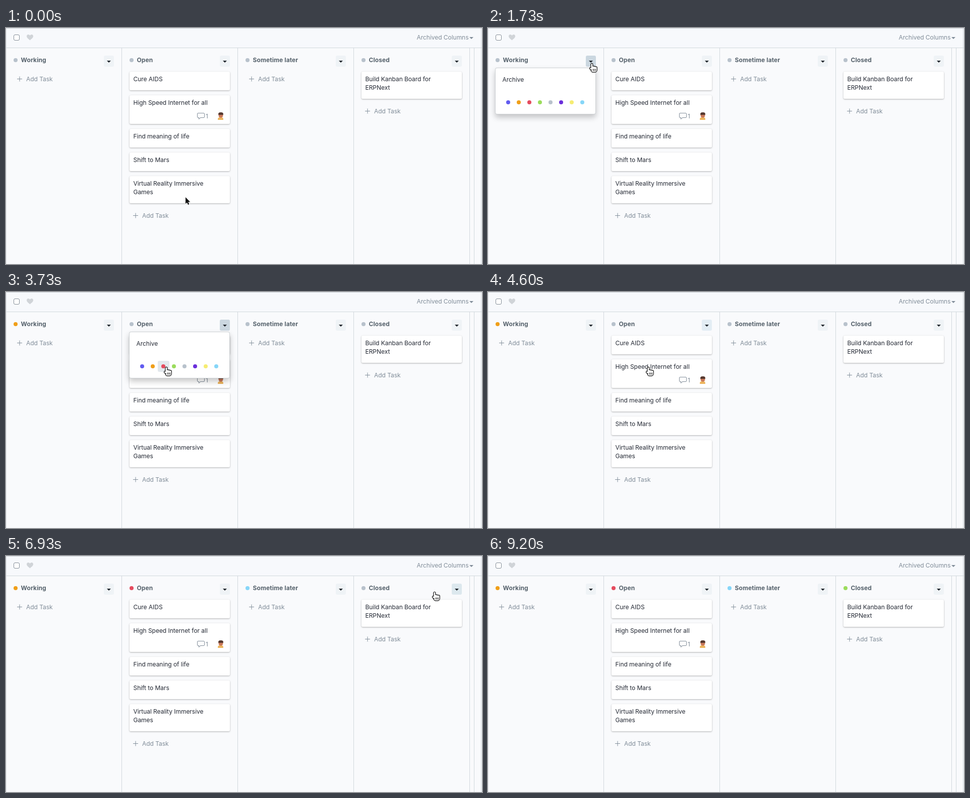
These frames come from a looping animation (944x470 px, 9.27 s). An HTML page with a canvas:

```html
<!DOCTYPE html>
<html lang="en">
<head>
<meta charset="utf-8">
<title>Kanban board</title>
<style>
  html, body { margin: 0; width: 100%; height: 100%; overflow: hidden; background: #f9fafc; }
  canvas { display: block; }
</style>
</head>
<body>
<canvas id="board" width="944" height="470"></canvas>
<script>
const ctx = document.getElementById('board').getContext('2d');
const W = 944, H = 470, LOOP = 9270, FPS = 15;
const COL = 230, LINE_H = 17, GAP = 10;
const FONT = '12px Inter, sans-serif';
const BOLD = 'bold ' + FONT;
const LINE = '#d1d8dd', MUTED = '#818d99', INK = '#252a35', GREY = '#b8c2cc';
const COLORS = ['#615cf0', '#f09f19', '#e54b5e', '#9bdc5c', GREY, '#6b2fdb', '#f6ec72', '#86d6f8'];

// Each column's menu opens, then closes when a colour is picked.
const columns = [
  { name: 'Working', open: 1560, close: 2300, pick: 1, cards: [] },
  { name: 'Open', open: 2980, close: 4530, pick: 2, cards: [
    { lines: ['Cure AIDS'] },
    { lines: ['High Speed Internet for all'], meta: true },
    { lines: ['Find meaning of life'] },
    { lines: ['Shift to Mars'] },
    { lines: ['Virtual Reality Immersive', 'Games'] }
  ] },
  { name: 'Sometime later', open: 5480, close: 6590, pick: 7, cards: [] },
  { name: 'Closed', open: 7150, close: 8350, pick: 3, cards: [
    { lines: ['Build Kanban Board for', 'ERPNext'] }
  ] }
];

const isOpen = (col, t) => t >= col.open && t < col.close;
const swatchX = i => 40 + 21 * i;

// The pointer visits every menu button, then the colour to pick.
const stops = [{ t: 250, x: 356, y: 337 }];
columns.forEach((col, i) => {
  const button = { x: i * COL + 206, y: 71 };
  const swatch = { x: i * COL + swatchX(col.pick) + 6, y: 150 };
  stops.push(
    { t: col.open - 150, ...button }, { t: col.open + 200, ...button },
    { t: col.open + 690, ...swatch }, { t: col.close + 70, ...swatch }
  );
});
stops.push({ t: 8740, x: 806, y: H + 10 });

function pointerAt(t) {
  const next = stops.findIndex(s => s.t > t);
  if (next === 0) return stops[0];
  if (next < 0) return stops[stops.length - 1];
  const a = stops[next - 1], b = stops[next];
  const u = (t - a.t) / (b.t - a.t);
  const k = u * u * (3 - 2 * u);
  const bow = a.x === b.x ? 0 : Math.sin(Math.PI * k);
  return {
    x: a.x + (b.x - a.x) * k - 70 * bow,
    y: a.y + (b.y - a.y) * k - 22 * bow
  };
}

function rect(x, y, w, h, color) {
  ctx.fillStyle = color;
  ctx.fillRect(x, y, w, h);
}

function rounded(x, y, w, h, r, color) {
  ctx.beginPath();
  ctx.roundRect(x, y, w, h, r);
  ctx.fillStyle = color;
  ctx.fill();
}

function dot(x, y, r, color) {
  ctx.beginPath();
  ctx.arc(x, y, r, 0, Math.PI * 2);
  ctx.fillStyle = color;
  ctx.fill();
}

function text(str, x, y, color, font = FONT) {
  ctx.font = font;
  ctx.letterSpacing = font === BOLD ? '0.1px' : '-0.04px';
  ctx.fillStyle = color;
  ctx.fillText(str, x, y);
}

function caret(x, y, color) {
  ctx.beginPath();
  ctx.moveTo(x - 4, y);
  ctx.lineTo(x + 4, y);
  ctx.lineTo(x, y + 4);
  ctx.fillStyle = color;
  ctx.fill();
}

function shadowed(blur, dy, alpha, paint) {
  ctx.save();
  ctx.shadowColor = `rgba(0,0,0,${alpha})`;
  ctx.shadowBlur = blur;
  ctx.shadowOffsetY = dy;
  paint();
  ctx.restore();
}

function heart(x, y) {
  ctx.beginPath();
  for (const side of [-1, 1]) {
    ctx.moveTo(x, y + 9.5);
    ctx.bezierCurveTo(x + side * 2.5, y + 7, x + side * 6.5, y + 4.5, x + side * 6.5, y + 1.5);
    ctx.bezierCurveTo(x + side * 6.5, y - 2.8, x + side * 1.5, y - 3, x, y);
  }
  ctx.fillStyle = '#d0d4d8';
  ctx.fill();
}

function toolbar() {
  rect(0, 0, W, 39, '#f7f9fc');
  rect(0, 39, W, 1, LINE);
  rounded(15.5, 13.5, 11, 11, 2.5, '#fff');
  ctx.strokeStyle = '#858e98';
  ctx.lineWidth = 1;
  ctx.stroke();
  heart(47.5, 15);
  text('Archived Columns', 814.5, 23, MUTED);
  caret(923, 18, MUTED);
}

function addTask(x, y) {
  rect(x + 22, y, 10, 1, MUTED);
  rect(x + 26.5, y - 4.5, 1, 10, MUTED);
  text('Add Task', x + 40, y + 5, MUTED);
}

function comments(x, y) {
  rounded(x + 0.5, y + 0.5, 14, 9, 1.5, '#fff');
  ctx.strokeStyle = MUTED;
  ctx.lineWidth = 1;
  ctx.stroke();
  ctx.beginPath();
  ctx.moveTo(x + 3.5, y + 9);
  ctx.lineTo(x + 3.5, y + 12.5);
  ctx.lineTo(x + 7, y + 9.5);
  ctx.fillStyle = '#fff';
  ctx.fill();
  ctx.stroke();
  text('1', x + 17, y + 11, MUTED);
}

function avatar(x, y) {
  rounded(x - 6, y + 4, 11, 5, [4, 4, 1, 1], '#ecb45c');
  dot(x, y, 4.5, '#c9785a');
  rounded(x - 5, y - 6, 10, 5, [4, 4, 1, 1], '#57392f');
}

function card(x, y, { lines, meta }) {
  const h = 20 + LINE_H * lines.length + (meta ? 20 : 0);
  shadowed(3, 1, 0.3, () => rounded(x + 15, y, 199, h, 2.5, '#fff'));
  lines.forEach((s, i) => text(s, x + 22.5, y + 19 + i * LINE_H, INK));
  if (meta) {
    comments(x + 149, y + 35);
    avatar(x + 196, y + 40);
  }
  return y + h + GAP;
}

function buttonColor(col, x, t, p) {
  if (isOpen(col, t)) return '#cbd7e0';
  if (Math.hypot(p.x - x - 204, p.y - 66) < 12) return '#dce8ee';
  return t >= col.close && t < col.close + 300 ? '#e3edf4' : '#eff3f6';
}

function column(col, x, t, p) {
  rect(x + 229, 40, 1, H, LINE);
  dot(x + 19, 64, 4, t >= col.close + 130 ? COLORS[col.pick] : GREY);
  text(col.name, x + 29.5, 68, '#56626c', BOLD);
  rounded(x + 194, 55, 20, 22, 3, buttonColor(col, x, t, p));
  caret(x + 204, 65, '#20262c');
  const end = col.cards.reduce((y, c) => card(x, y, c), 87);
  addTask(x, end + 14);
}

function menu(x, p) {
  shadowed(12, 6, 0.22, () => rounded(x + 14, 79, 200, 93, 4, '#cdd1d4'));
  rounded(x + 15, 80, 198, 91, 3, '#fff');
  text('Archive', x + 28.5, 107, INK);
  COLORS.forEach((color, i) => {
    const cx = x + swatchX(i);
    const hover = Math.abs(p.x - cx) < 10.5 && Math.abs(p.y - 148) < 12;
    if (hover) rounded(cx - 11, 137, 23, 22, 3, '#e2e8ed');
    dot(cx, 148, 4, color);
  });
}

function arrow() {
  ctx.beginPath();
  ctx.moveTo(0, 0);
  ctx.lineTo(0, 13);
  ctx.lineTo(3, 10.4);
  ctx.lineTo(5, 15);
  ctx.lineTo(7.3, 14);
  ctx.lineTo(5.3, 9.6);
  ctx.lineTo(9.3, 9.6);
  ctx.closePath();
  ctx.strokeStyle = '#fff';
  ctx.lineWidth = 1.6;
  ctx.stroke();
  ctx.fillStyle = '#111';
  ctx.fill();
}

function hand() {
  const shape = new Path2D();
  for (let i = 0; i < 4; i++) {
    const top = i ? 4.6 + 0.6 * i : 0;
    shape.roundRect(-1.5 + 2.8 * i, top, 2.8, 12 - top, 1.4);
  }
  shape.roundRect(-1.5, 9, 11.2, 7.5, [0, 0, 4, 4]);
  shape.moveTo(-1, 8.5);
  shape.lineTo(-3.5, 8.3);
  shape.lineTo(-4, 9.8);
  shape.lineTo(0, 14.5);
  shape.closePath();
  ctx.strokeStyle = '#111';
  ctx.lineWidth = 2.4;
  ctx.lineJoin = 'round';
  ctx.stroke(shape);
  ctx.fillStyle = '#fff';
  ctx.fill(shape);
  for (let x = 2; x < 8; x += 2.4) rect(x, 10.5, 1, 4, '#111');
}

function pointer(t) {
  const p = pointerAt(t);
  ctx.save();
  ctx.translate(p.x, p.y);
  if (t < 1100 || t > 8450) arrow();
  else hand();
  ctx.restore();
}

function draw(t) {
  // The page reacts slightly ahead of the visible pointer.
  const live = pointerAt(t + 80);
  rect(0, 0, W, H, '#f9fafc');
  toolbar();
  columns.forEach((col, i) => column(col, i * COL, t, live));
  rect(928, 40, 1, H, LINE);
  columns.forEach((col, i) => {
    if (isOpen(col, t)) menu(i * COL, live);
  });
  rect(0, 0, W, 1, '#cbd0d5');
  rect(0, 0, 1, H, '#e3e7eb');
  rect(W - 2, 0, 1, H, LINE);
  pointer(t);
}

const start = performance.now();

function tick(now) {
  const t = Math.max(now - start, 0) % LOOP;
  draw(Math.floor((t + 5) * FPS / 1000) * 1000 / FPS);
  requestAnimationFrame(tick);
}

draw(0);
requestAnimationFrame(tick);
</script>
</body>
</html>
```
